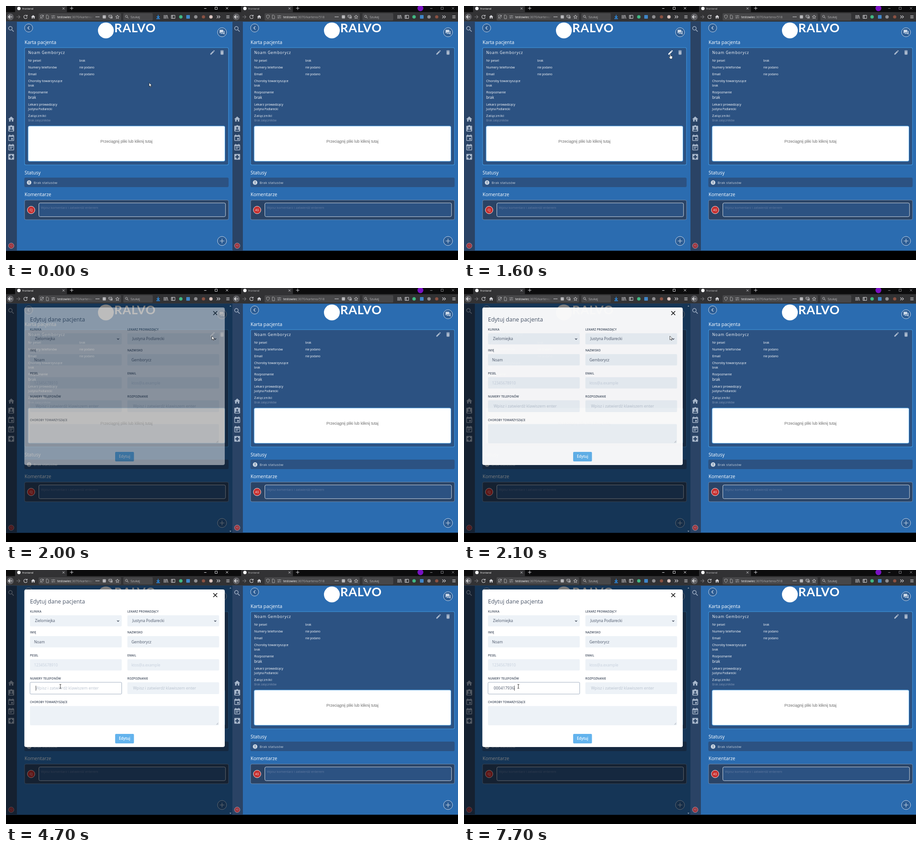
Write an HTML page that moves like this. It is 998 px wide and 561 px high and loops after 8000 ms.

```html
<!DOCTYPE html>
<html lang="pl">
<head>
<meta charset="utf-8">
<title>Karta pacjenta</title>
<style>
  html, body { margin: 0; width: 100%; height: 100%; overflow: hidden; background: #000; }
  svg { display: block; width: 998px; height: 561px; }
  text { font-family: 'Open Sans', 'Noto Sans', sans-serif; white-space: pre; }
</style>
</head>
<body>
<svg id="stage" viewBox="0 0 998 561" xmlns="http://www.w3.org/2000/svg"></svg>
<script>
const PATIENT = ['Noam', 'Gemborycz'], DOCTOR = 'Justyna Podlarecki', CLINIC = 'Zielomiejka';
const PHONE = '000417936', HOST = 'testowiec', PATH = ':3070/karteno/518';
const TAG_HINT = 'Wpisz i zatwierdź klawiszem enter';
const TOP = 34.5, BOTTOM = 540.5;

const ICON = {
  search: 'M15.5 14h-.8l-.3-.3a6.5 6.5 0 1 0-.7.7l.3.3v.8l5 5 1.5-1.5zm-6 0a4.5 4.5 0 1 1 0-9 4.5 4.5 0 0 1 0 9z',
  home: 'M10 20v-6h4v6h5v-8h3L12 3 2 12h3v8z',
  badge: 'M19 3h-4.2a3 3 0 0 0-5.6 0H5a2 2 0 0 0-2 2v14a2 2 0 0 0 2 2h14a2 2 0 0 0 2-2V5a2 2 0 0 0-2-2zM12 7a3 3 0 1 1 0 6 3 3 0 1 1 0-6zM6 19v-1.4c0-2 4-3.1 6-3.1s6 1.1 6 3.1V19z',
  calendar: 'M17 12h-5v5h5zM16 1v2H8V1H6v2H5a2 2 0 0 0-2 2v14a2 2 0 0 0 2 2h14a2 2 0 0 0 2-2V5a2 2 0 0 0-2-2h-1V1zm3 18H5V8h14z',
  note: 'M17 10H7v2h10zM19 3h-1V1h-2v2H8V1H6v2H5a2 2 0 0 0-2 2v14a2 2 0 0 0 2 2h14a2 2 0 0 0 2-2V5a2 2 0 0 0-2-2zm0 16H5V8h14zm-5-5H7v2h7z',
  add: 'M19 3H5a2 2 0 0 0-2 2v14a2 2 0 0 0 2 2h14a2 2 0 0 0 2-2V5a2 2 0 0 0-2-2zm-1 11h-4v4h-4v-4H6v-4h4V6h4v4h4z',
  pencil: 'M3 17.25V21h3.75L17.81 9.94l-3.75-3.75zM20.71 7.04a1 1 0 0 0 0-1.41l-2.34-2.34a1 1 0 0 0-1.41 0l-1.83 1.83 3.75 3.75z',
  trash: 'M6 19a2 2 0 0 0 2 2h8a2 2 0 0 0 2-2V7H6zM19 4h-3.5l-1-1h-5l-1 1H5v2h14z',
  chat: 'M21 6h-2v9H6v2a1 1 0 0 0 1 1h11l4 4V7a1 1 0 0 0-1-1zm-4 6V3a1 1 0 0 0-1-1H3a1 1 0 0 0-1 1v14l4-4h10a1 1 0 0 0 1-1z',
  star: 'M12 3l2.7 6 6.3.6-4.8 4.3 1.4 6.4L12 17l-5.6 3.3 1.4-6.4L3 9.6l6.3-.6z'
};

const text = (x, y, s, size = 7.28, fill = '#fff', attrs = '') =>
  `<text x="${x}" y="${y}" font-size="${size}" fill="${fill}" ${attrs}>${s}</text>`;
// Box given by its left, top, right and bottom edges
const box = (l, t, r, b, fill, radius = 0, attrs = '') =>
  `<rect x="${l}" y="${t}" width="${r - l}" height="${b - t}" rx="${radius}" fill="${fill}" ${attrs}/>`;
const dot = (x, y, r, fill, attrs = '') => `<circle cx="${x}" cy="${y}" r="${r}" fill="${fill}" ${attrs}/>`;
const line = (d, stroke, width = 1, attrs = '') =>
  `<path d="${d}" fill="none" stroke="${stroke}" stroke-width="${width}" ${attrs}/>`;
const icon = (name, x, y, size, fill, attrs = '') =>
  `<path d="${ICON[name]}" fill="${fill}" fill-rule="evenodd" transform="translate(${x - size / 2} ${y - size / 2}) scale(${size / 24})" ${attrs}/>`;
const ring = (x, y, r) => dot(x, y, r, '#2c5282', 'fill-opacity=".6" stroke="#c3d3e6"');
const cross = (x, y, r, stroke, width) =>
  line(`M${x - r} ${y - r}l${2 * r} ${2 * r}m0 ${-2 * r}l${-2 * r} ${2 * r}`, stroke, width);
const plus = (x, y, r, stroke, width) => line(`M${x - r} ${y}h${2 * r}M${x} ${y - r}v${2 * r}`, stroke, width);
const spaced = em => `letter-spacing="${em}em"`;

function browser(second) {
  const ui = '#d7d7db', frame = second ? '#8a8a8d' : '#e8e8ea', field = '#474749';
  const urlEnd = second ? 282 : 254, searchAt = second ? 288 : 259, searchEnd = second ? 356 : 324;
  const [books, side, green, blue, grey, brown] =
    second ? [369, 386, 402, 419, 435, 452] : [352, 369, 386, 402, 419, 436];
  const [more, pocket, shot, star] = second ? [231, 246, 260, 274] : [202, 217, 231, 246];
  const overflow = second ? 468 : 469;
  return box(0, 0, 499, 14, '#0c0c0d') + box(20, 0, 134.5, 14, '#323234') + box(0, 13.5, 499, 35, '#323234')
    + dot(28.5, 5.5, 3.7, '#fff') + text(36, 8, 'frontend', 6, second ? '#c5c5c8' : '#fff')
    + cross(127, 5.5, 2.2, ui, .9) + plus(145, 5, 3.7, ui, 1)
    + line('M437.5 5.5h5', frame) + line('M461.5 2.5h5v5h-5z', frame, .9) + cross(488, 5, 2.5, frame, .9)
    + (second ? dot(416, 5, 6.5, '#7a12c4') : '')
    + dot(9.5, 24, 7.5, '#5f5f63') + line('M13.5 24h-8m3.5-3.5l-3.5 3.5 3.5 3.5', '#f9f9fa', 1.2)
    + line('M23 24h8m-3.5-3.5l3.5 3.5-3.5 3.5', '#77777a', 1.1)
    + line('M46 21.5a3.8 3.8 0 1 0 .8 3.5M46.8 19.5v3h-3', ui, 1.1)
    + icon('home', 60, 24, 11, ui)
    + box(72, 16, urlEnd, 32, field, 2)
    + line('M76 21l3.3-1.3 3.3 1.3c0 3-1 5.5-3.3 7-2.3-1.5-3.3-4-3.3-7z', '#b1b1b3', .9)
    + (second ? '' : line('M75.5 27.5l7.5-7.5', '#d7d7db', .9))
    + line('M89 20h3l2 2v6h-5z', '#b1b1b3', .9)
    + line('M100 22h4m1.5 0h3M100 26h1.5m2 0h5M105 20.5v3M102.5 24.5v3', '#c5c5c8', .9)
    + text(113, 26.5, `${HOST}<tspan fill="#aaaaac">${PATH}</tspan>`, 7, '#f9f9fa')
    + (second ? '' : box(178, 18, 194, 30, 'url(#fade)') + box(193.5, 18, 253, 30, field))
    + [-3, 0, 3].map(d => dot(more + d, 24, 1, ui)).join('')
    + box(pocket - 3.5, 20.5, pocket + 3.5, 27.5, '#b9b9bc', 1)
    + line(`M${shot - 4} 20.5h6.5v4h-6.5zM${shot - 2} 27h5.5v-4M${shot - 1} 23l4 4`, ui, .9)
    + icon('star', star, 24, 10.5, 'none', `stroke="${ui}" stroke-width="2"`)
    + box(searchAt, 16, searchEnd, 32, field, 2)
    + icon('search', searchAt + 8, 24, 10, '#c5c5c8') + text(searchAt + 16, 26.5, 'Szukaj', 7, '#b8b8bb')
    + (second ? '' : line('M336 19.5v6m-3-2.5l3 3 3-3M332 28h8', '#2d9bff', 1.3))
    + line(`M${books - 3} 20v8m2.5-8v8m2.5-8v8m1.5-8l2 8`, ui, 1)
    + line(`M${side - 4} 20.5h8v7h-8zM${side - 1} 20.5v7M${side - 3} 22.5h1m-1 2h1`, ui, 1)
    + dot(green, 24, 3.8, '#41b883') + box(blue - 4, 20, blue + 4, 28, '#3f86c8', 1)
    + dot(grey, 24, 3.8, '#8e8e91') + dot(brown, 24, 3.6, '#8b5142')
    + (second ? '' : dot(452.5, 24, 3.8, '#d8c2bd'))
    + line(`M${overflow - 3.5} 21l3 3-3 3m4-6l3 3-3 3`, ui, 1.1)
    + line('M486.5 21.5h7m-7 2.5h7m-7 2.5h7', ui, 1);
}

function page(initials, pencilId) {
  const soft = '#a9b8cc', edge = 'stroke="#4299e1" stroke-width="1.04"';
  const value = (x, y, s) => text(x, y, s, 6.24, '#fff', 'font-weight="500"');
  const avatar = (x, y, r, size, stroke) => dot(x, y, r, '#c53030', `stroke="${stroke}"`)
    + text(x, y + size * .36, initials, size, stroke, 'text-anchor="middle"');
  const rows = [['Nr pesel', 'brak', 123], ['Numery telefonów', 'nie podano', 138], ['Email', 'nie podano', 153]];
  return box(0, TOP, 499, BOTTOM, '#2b6cb0') + box(0, TOP, 24, BOTTOM, '#2a4365')
    + icon('search', 11.5, 51, 17, soft)
    + ['home', 'badge', 'calendar', 'note', 'add'].map((n, i) => icon(n, 11.5, 250 + i * 20.8, i ? 17 : 16, soft)).join('')
    + `<g opacity=".75">${avatar(11.5, 529.5, 6, 5, '#d5b5bd')}</g>`
    + ring(50, 48.5, 9) + line('M51.5 45l-3.5 3.5 3.5 3.5', '#d6e2f0', 1.2)
    + dot(220.5, 54, 17.5, '#fff')
    + text(239, 58.3, 'RALVO', 27, '#fff', `font-weight="700" style="font-family:Lato,sans-serif" ${spaced(.03)}`)
    + ring(477, 58, 10) + icon('chat', 477, 58, 13, '#d0dcea')
    + text(41, 84, 'Karta pacjenta', 10.4)
    + box(41, 92, 491.3, 351, '#2c5282', 3, edge)
    + text(49, 105.5, PATIENT.join(' '), 8.32, '#fff', spaced(.1))
    + icon('pencil', 456, 102.5, 13, soft, `id="${pencilId}"`) + icon('trash', 477, 102.5, 13, soft)
    + rows.map(([k, v, y]) => text(49, y, k) + value(162, y - .2, v)).join('')
    + text(49, 168.3, 'Choroby towarzyszące') + value(49, 178.2, 'brak')
    + text(49, 192.5, 'Rozpoznanie') + text(49, 204.5, 'brak', 8.32)
    + text(49, 220, 'Lekarz prowadzący') + value(49, 230.2, DOCTOR)
    + text(49, 244.5, 'Załączniki', 7.28, '#fff', spaced(.1)) + text(49, 254.5, 'Brak załączników', 6.24, '#8397b5')
    + box(48.8, 265, 483.5, 343, '#fff', 3, edge)
    + text(266, 302.3, 'Przeciągnij pliki lub kliknij tutaj', 8.58, '#6b6b6b',
        `text-anchor="middle" style="font-family:'Liberation Sans',Arial,sans-serif"`)
    + text(41, 371.5, 'Statusy', 10.4) + box(40.5, 379, 491.5, 400, '#2c5282', 3)
    + dot(51, 390, 5, '#cbd5e0') + line('M51 387v3.5m0 1v1.3', '#2c5282', 1.2)
    + text(61, 392.5, 'Brak statusów', 7.28, '#cbd5e0', spaced(.05))
    + text(41, 420, 'Komentarze', 10.4)
    + box(41, 428.7, 491.3, 472, '#2a4365', 3, 'stroke="#7188a8"')
    + avatar(55.5, 450.5, 8.3, 7, '#f3e4e6')
    + box(72.5, 435, 484.7, 465.3, '#2c5282', 3, 'stroke="#cbd5e0"')
    + text(77, 447.5, 'Wpisz komentarz i zatwierdź enterem', 7.28, '#6079a0')
    + ring(477, 519, 10) + plus(477, 519, 5, '#d0dcea', 1.1);
}

function dialog() {
  const ink = '#4a5568', pale = '#c5cfdc', fill = '#edf2f7';
  const label = (x, y, s) => text(x, y, s, 6.24, '#3b4658', `font-weight="600" ${spaced(.025)}`);
  const columns = [53, 268];
  const fields = [
    [100, 124.5, ['KLINIKA', 'LEKARZ PROWADZĄCY'], [CLINIC, DOCTOR], 11, 8.32, ink],
    [146, 171, ['IMIĘ', 'NAZWISKO'], PATIENT, 9, 8.32, ink],
    [197, 222, ['PESEL', 'EMAIL'], ['12345678910', 'ktos@a.example'], 9, 8.32, pale],
    [248, 274, ['NUMERY TELEFONÓW', 'ROZPOZNANIE'], ['', TAG_HINT], 12.5, 8.83, '#b7c1ce']
  ];
  return box(40.5, 43, 483, 391, '#fff', 4) + cross(462, 55.5, 4.3, '#111', 1.6)
    + text(53, 74, 'Edytuj dane pacjenta', 12.48, ink)
    + fields.map(([top, bottom, labels, values, pad, size, color]) => columns.map((x, i) =>
        label(x, top - 6, labels[i]) + box(x, top, x + 202.5, bottom, fill, 2)
        + text(x + pad, (top + bottom) / 2 + size * .38, values[i], size, color)).join('')).join('')
    + [247.5, 462].map(x => line(`M${x - 2.2} 111.5l2.2 2.2 2.2-2.2`, '#2d3748', 1.1)).join('')
    + label(53, 294, 'CHOROBY TOWARZYSZĄCE') + box(53, 300.5, 470, 343, fill, 2)
    + line('M464.5 341.5l4-4m-1.7 4l1.7-1.7', '#8a8f98', .7)
    + box(241, 362, 282.5, 383, '#63b3ed', 2)
    + text(261.7, 375.3, 'Edytuj', 8.32, '#fff', 'text-anchor="middle" font-weight="600"')
    + box(53, 248, 255.5, 274, '#fff', 2, 'id="focus" stroke="#a0aec0"')
    + text(65.5, 264.4, TAG_HINT, 8.83, '#b7c1ce', 'id="hint"')
    + text(65.5, 264.4, '', 8.83, ink, 'id="typed"')
    + line('M0 255.5v11', '#222', .8, 'id="caret"');
}

const pointers =
  `<path id="arrow" d="M0 0v8.5l2-1.8 1.3 3 1.4-.6-1.3-2.9h2.7z" fill="#fff" stroke="#111" stroke-width=".7"/>`
  + `<path id="hand" d="M.2.8c0-1.1 1.6-1.1 1.6 0v3.4l3 .7c.8.2 1 .7.9 1.4l-.5 3.2-.6 1.3h-3.8l-2.6-3.8c-.5-.8.3-1.4 1-.8l1 .9z" fill="#fff" stroke="#111" stroke-width=".6"/>`
  + line('M-2-4.5q1.6 0 2 .8.4-.8 2-.8M0-4v8M-2 4.5q1.6 0 2-.8.4.8 2 .8', '#222', .9, 'id="beam"');

// A turned square with a half circle on each upper side
const loader = '<path id="loader" d="M0 11.6L11.6 0A8.2 8.2 0 0 0 0-11.6A8.2 8.2 0 0 0-11.6 0z" fill="#fff" transform="translate(248 289.4)"/>';

stage.innerHTML =
  `<defs><linearGradient id="fade"><stop stop-color="#474749" stop-opacity="0"/><stop offset="1" stop-color="#474749"/></linearGradient></defs>`
  + box(0, 0, 998, 561, '#000')
  + `<g transform="translate(499)">${browser(true)}${page('AS', 'pencil2')}</g>`
  + `<g>${browser(false)}${page('CJ', 'pencil')}${box(499, TOP, 500, BOTTOM, '#2b6cb0')}</g>`
  + `<g id="shade">${box(0, TOP, 500, BOTTOM, '#000', 0, 'opacity=".51"')}</g>`
  + `<path id="scroll" d="M493.5 41l2-3 2 3zM493.5 536l2 3 2-3z" fill="#8796a8"/>`
  + `<g id="dialog">${dialog()}</g>` + loader
  + `<g id="pointer">${pointers}</g>`;

const $ = id => document.getElementById(id);
const show = (id, on) => $(id).setAttribute('visibility', on ? 'visible' : 'hidden');
const clamp = v => Math.max(0, Math.min(1, v));

// Pointer stops: time, x, y
const stops = [[200, 316, 169.5], [900, 455, 101], [1100, 455, 101], [1600, 454.5, 106], [2200, 454.5, 106],
  [2700, 248, 162], [3600, 128, 246], [3800, 120, 257]];
const keyTimes = [5300, 5500, 5700, 6000, 6100, 6400, 6600, 6900, 7100];

function pointerAt(t) {
  const i = stops.findIndex(s => s[0] > t);
  if (i < 0) return stops[stops.length - 1].slice(1);
  if (!i) return stops[0].slice(1);
  const [t0, x0, y0] = stops[i - 1], [t1, x1, y1] = stops[i];
  const k = (t - t0) / (t1 - t0), e = k * k * (3 - 2 * k);
  return [x0 + (x1 - x0) * e, y0 + (y1 - y0) * e];
}

function draw(now) {
  const t = Math.floor(now % 8000 / 100) * 100;
  const hover = t >= 800 && t < 1900, open = t >= 1900, beam = t >= 2700;
  show('shade', open);
  show('dialog', open);
  show('loader', t === 1900);
  show('scroll', t >= 2000);
  $('dialog').setAttribute('opacity', clamp((t - 1895) / 215));
  $('pencil').setAttribute('fill', hover ? '#fff' : '#a9b8cc');

  $('pointer').setAttribute('transform', `translate(${pointerAt(t)})`);
  show('hand', hover);
  show('beam', beam);
  show('arrow', !hover && !beam);

  const count = keyTimes.filter(k => k <= t).length;
  $('focus').setAttribute('opacity', clamp((t - 3900) / 400));
  $('hint').setAttribute('opacity', count ? 0 : 1);
  $('typed').textContent = PHONE.slice(0, count);
  $('caret').setAttribute('transform', `translate(${66 + count * 5.05})`);
  const blinkOn = t >= 4100 && t < 5000 || t >= 5300 && t < 7100 || t >= 7700;
  $('caret').setAttribute('opacity', blinkOn ? 1 : 0);
  requestAnimationFrame(draw);
}
requestAnimationFrame(draw);
</script>
</body>
</html>
```
